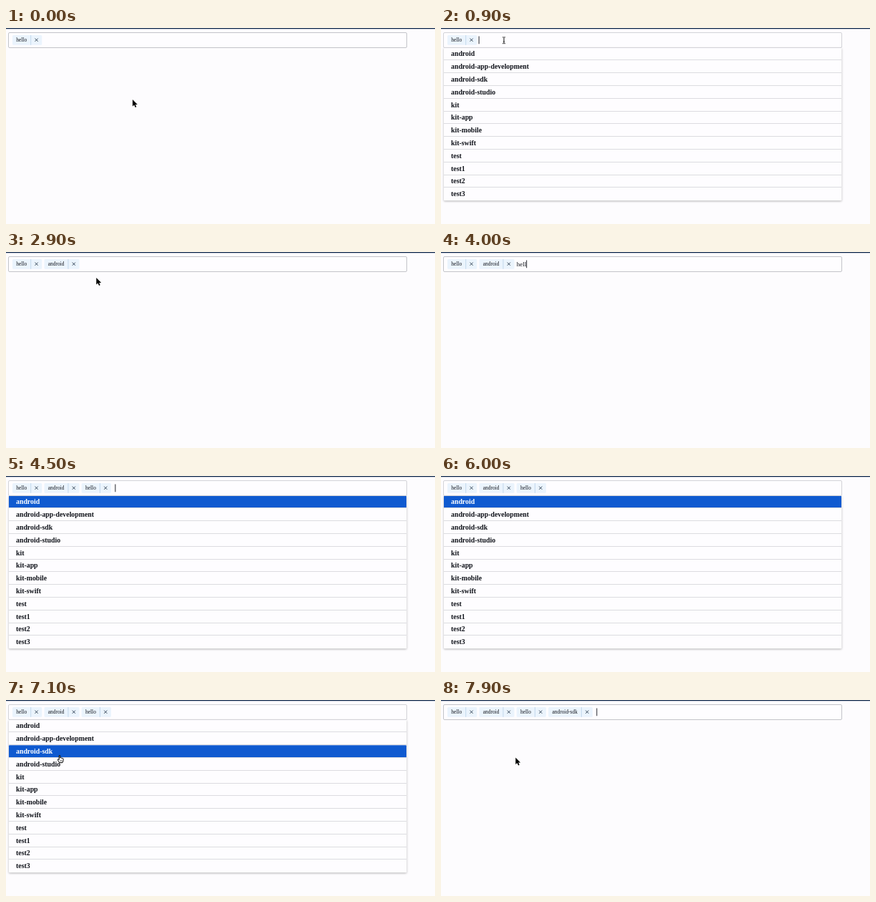
Recreate the animation shown at these times as an HTML page with a canvas. Size 600 by 274 pixels, loop 8 s.

```html
<!DOCTYPE html>
<html lang="en">
<head>
<meta charset="utf-8">
<title>Tag input</title>
<style>
  html, body { margin: 0; width: 100%; height: 100%; overflow: hidden; background: #fdfcfe; }
  canvas { display: block; width: 600px; height: 274px; }
</style>
</head>
<body>
<canvas id="stage"></canvas>
<script>
const canvas = document.getElementById('stage');
const ctx = canvas.getContext('2d');
const W = 600, H = 274, LOOP = 8000;
const SERIF = '"Liberation Serif", serif';
const INK = '#10131a', BLUE = '#0f5ad0';
const ROW_TOP = 27.6, ROW_H = 17.8;

const options = ['android', 'android-app-development', 'android-sdk', 'android-studio',
  'kit', 'kit-app', 'kit-mobile', 'kit-swift', 'test', 'test1', 'test2', 'test3'];

// Tags with the time each one is added
const tags = [[0, 'hello'], [2400, 'android'], [4500, 'hello'], [7400, 'android-sdk']];
const caretX = [52.6, 104.9, 152.4, 217.4];

// Step lists: [time, value...]; the last step not after t applies
const menu = [[0, false], [800, true], [2400, false], [4500, true], [7400, false]];
const caret = [[0, false], [800, true], [1300, false], [1800, true], [2300, false],
  [2400, true], [2900, false], [3400, true], [5000, false], [5500, true],
  [6000, false], [6500, true], [7000, false], [7500, true]];
const typed = [[0, ''], [3500, 'h'], [3800, 'he'], [3900, 'hel'], [4000, 'hell'],
  [4200, 'hello'], [4500, '']];

const mouse = [
  [0, 177, 100, 'arrow'], [100, 168, 72, 'arrow'], [200, 144, 32, 'arrow'],
  [300, 115, 2, 'arrow'], [400, 95, 11, 'beam'], [500, 88, 17, 'beam'],
  [1900, 87.5, 18, 'beam'], [2000, 86, 21, 'beam'], [2100, 84, 25, 'beam'],
  [2200, 82, 29, 'hand'], [2300, 81.5, 31, 'hand'],
  [2600, 90, 32, 'arrow'], [2700, 108, 34, 'arrow'], [2800, 121, 36, 'arrow'],
  [2900, 126.3, 36, 'arrow'], [3500, 126.3, 36, 'none'],
  [6500, 119, 38, 'hand'], [6600, 104, 43, 'hand'], [6700, 88.5, 49.5, 'hand'],
  [6800, 83, 57, 'hand'], [6900, 79, 66, 'hand'], [7000, 76, 73, 'hand'],
  [7100, 75, 77, 'hand'], [7800, 91, 79, 'arrow'], [7900, 104.3, 80.5, 'arrow']
];

const at = (steps, t) => steps.reduce((cur, s) => s[0] <= t ? s : cur, steps[0]);

function text(str, x, y, font, color) {
  ctx.font = font;
  ctx.fillStyle = color;
  ctx.fillText(str, x, y);
  return ctx.measureText(str).width;
}

function line(x1, y1, x2, y2, color, width) {
  ctx.strokeStyle = color;
  ctx.lineWidth = width;
  ctx.beginPath();
  ctx.moveTo(x1, y1);
  ctx.lineTo(x2, y2);
  ctx.stroke();
}

function rect(x, y, w, h, color, radius = 0) {
  ctx.fillStyle = color;
  ctx.beginPath();
  ctx.roundRect(x, y, w, h, radius);
  ctx.fill();
}

function drawField(open) {
  ctx.beginPath();
  ctx.roundRect(3.5, 6.5, 557, 21, 1.5);
  ctx.fillStyle = '#fefdff';
  ctx.fill();
  ctx.strokeStyle = open ? '#d3d3d8' : '#c3c4c9';
  ctx.lineWidth = 1;
  ctx.stroke();
}

function drawTags(list) {
  const font = '7.4px ' + SERIF;
  let x = 14.3;
  for (const [, label] of list) {
    ctx.font = font;
    const w = ctx.measureText(label).width;
    rect(x - 5.3, 10, w + 26.5, 13.8, '#ebf4fd', 1.5);
    text(label, x, 19.2, font, INK);
    line(x + w + 5.6, 10, x + w + 5.6, 23.8, '#bfd6ea', 0.9);
    const cx = x + w + 13.5, cy = 16.7, r = 2.1;
    line(cx - r, cy - r, cx + r, cy + r, '#26384c', 0.9);
    line(cx - r, cy + r, cx + r, cy - r, '#26384c', 0.9);
    x += w + 29.7;
  }
}

function drawMenu(hover) {
  ctx.save();
  ctx.shadowColor = 'rgba(0,0,0,0.3)';
  ctx.shadowBlur = 3 * scale;
  ctx.shadowOffsetY = scale;
  rect(4, ROW_TOP, 556.3, ROW_H * options.length, '#fefdff', 1);
  ctx.restore();
  options.forEach((label, i) => {
    const y = ROW_TOP + i * ROW_H;
    const active = i === hover;
    if (i) line(4, Math.round(y) - 0.5, 560, Math.round(y) - 0.5, '#dcdce0', 1);
    if (active) rect(4, y, 556, ROW_H - 0.3, BLUE, 1);
    text(label, 14, y + 11.7, 'bold 9.83px ' + SERIF, active ? '#fff' : INK);
  });
  line(4, 27.5, 560, 27.5, '#d3d3d8', 1);
}

const arrowPath = new Path2D('M0 0V9.6L2.2 7.6L3.8 11L5.4 10.3L3.9 7H6.9Z');
const handPath = new Path2D('M-.8 .8Q0-.4 .8 .8V4Q1.7 3.2 2.4 4.2Q3.3 3.6 3.8 4.7' +
  'Q5 4.2 5.1 5.5V7.5Q5 9 4 10.6H-.4Q-1 9-2.4 7.4Q-3.3 6-2.1 5.6L-.8 6.6Z');

function drawMouse([, x, y, kind]) {
  ctx.save();
  ctx.translate(x, y);
  ctx.lineJoin = 'round';
  if (kind === 'arrow') {
    ctx.strokeStyle = '#fff';
    ctx.lineWidth = 1.4;
    ctx.stroke(arrowPath);
    ctx.fillStyle = '#000';
    ctx.fill(arrowPath);
  } else if (kind === 'hand') {
    ctx.fillStyle = '#fff';
    ctx.fill(handPath);
    ctx.strokeStyle = '#000';
    ctx.lineWidth = 1;
    ctx.stroke(handPath);
    line(1.2, 7, 1.2, 9, '#000', 0.6);
    line(3, 7, 3, 9, '#000', 0.6);
  } else if (kind === 'beam') {
    line(0, -3.6, 0, 4.2, '#111', 1);
    for (const end of [-4.1, 4.7]) {
      line(-2, end, -0.3, end, '#111', 0.9);
      line(0.3, end, 2, end, '#111', 0.9);
    }
    line(-1.2, 2, 1.2, 2, '#111', 0.7);
  }
  ctx.restore();
}

function draw(t) {
  const pointer = at(mouse, t);
  const open = at(menu, t)[1];
  const shown = tags.filter(tag => tag[0] <= t);
  const entry = at(typed, t)[1];

  rect(0, 0, W, H, '#fdfcfe');
  rect(0, 0, W, 1.3, '#0b2447');
  drawField(open);
  drawTags(shown);

  let x = caretX[shown.length - 1];
  if (entry) x += 0.8 + text(entry, x + 0.8, 19.8, '9px ' + SERIF, INK);
  if (at(caret, t)[1]) rect(x, 11.5, 1, 10.8, '#22242a');

  if (open) drawMenu(Math.floor((pointer[2] - ROW_TOP) / ROW_H));
  drawMouse(pointer);
}

const scale = window.devicePixelRatio || 1;
canvas.width = W * scale;
canvas.height = H * scale;
ctx.scale(scale, scale);

const start = performance.now();
function frame() {
  draw((performance.now() - start) % LOOP);
  requestAnimationFrame(frame);
}
frame();
</script>
</body>
</html>
```
